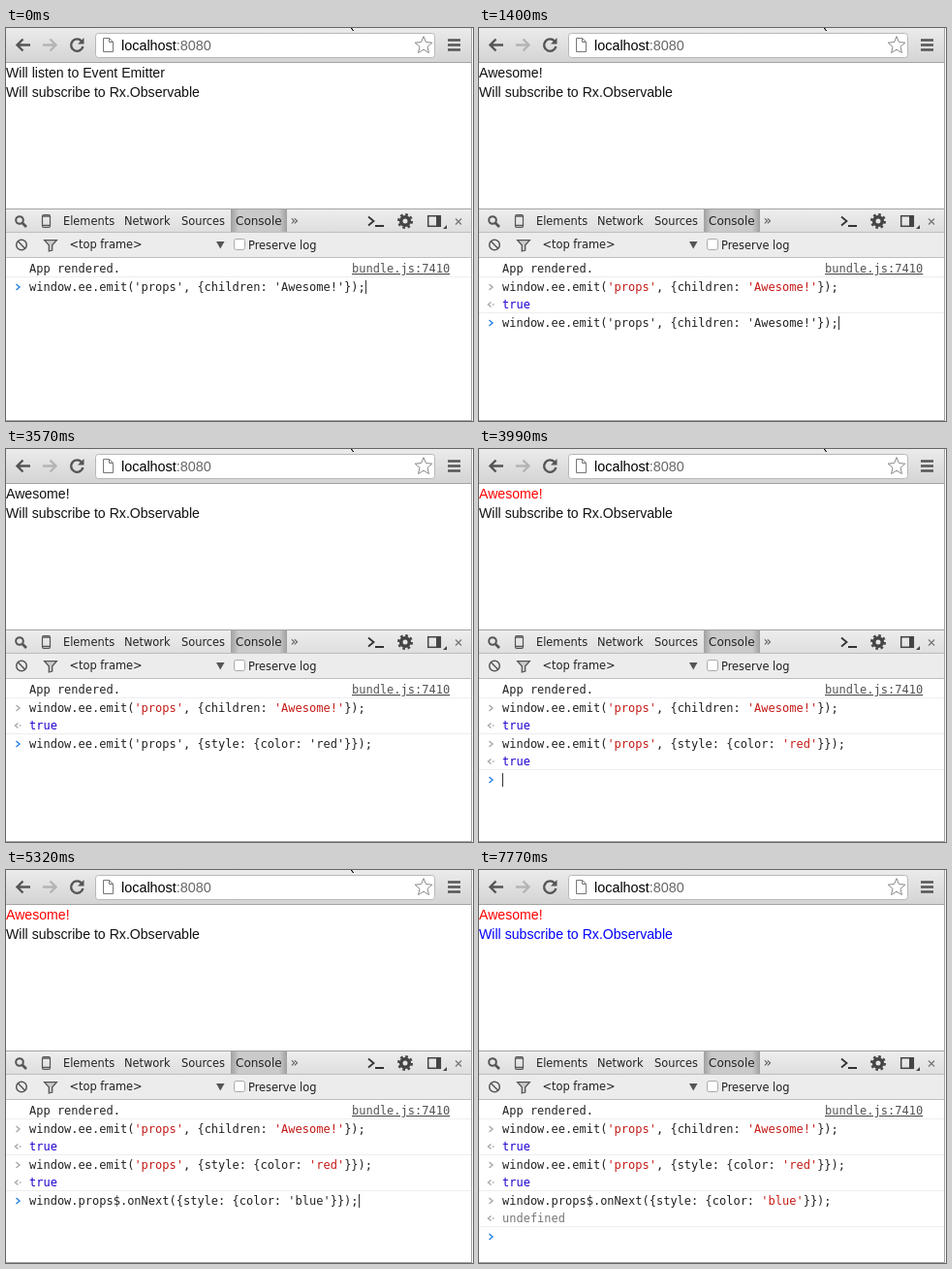
Write an HTML page that moves like this. It is 482 px wide and 405 px high and loops after 8.05 s.

```html
<!DOCTYPE html>
<html lang="en">
<head>
<meta charset="utf-8">
<title>Console demo</title>
<style>
html, body { margin: 0; width: 100%; height: 100%; overflow: hidden; background: #fff; }
svg { display: block; }
text { white-space: pre; fill: #222; }
.page { font: 14.12px "Liberation Sans", Arial, sans-serif; fill: #111; }
.ui { font: 11.4px "DejaVu Sans", sans-serif; }
.mono { font: 12px "DejaVu Sans Mono", monospace; }
.line { fill: none; stroke: #555; stroke-width: 1.5; }
</style>
</head>
<body>
<svg width="482" height="405" viewBox="0 0 482 405">
  <defs>
    <linearGradient id="bar" x2="0" y2="1"><stop stop-color="#ebebeb"/><stop offset="1" stop-color="#d4d4d4"/></linearGradient>
    <linearGradient id="tools" x2="0" y2="1"><stop stop-color="#eee"/><stop offset="1" stop-color="#dedede"/></linearGradient>
    <linearGradient id="tab"><stop stop-color="#a0a0a0"/><stop offset=".14" stop-color="#cacaca"/><stop offset=".86" stop-color="#cacaca"/><stop offset="1" stop-color="#a0a0a0"/></linearGradient>
  </defs>

  <!-- browser bar -->
  <rect width="481" height="35" fill="url(#bar)"/>
  <rect y="35" width="481" height="1" fill="#a3a3a3"/>
  <rect x="92.5" y="5.5" width="350" height="25" rx="3" fill="#fff" stroke="#b8b8b8"/>
  <g fill="none" stroke-width="2.4">
    <path d="M25 17.5H12M17.5 11.5L11.5 17.5L17.5 23.5" stroke="#555"/>
    <path d="M38 17.5H51M45.5 11.5L51.5 17.5L45.5 23.5" stroke="#b4b4b4"/>
    <path d="M78 13.5A6.2 6.2 0 1 0 79.4 19" stroke="#555"/>
    <path d="M456 12.5H469M456 17.5H469M456 22.5H469" stroke="#555"/>
  </g>
  <path d="M80.5 10V16.5H74Z" fill="#555"/>
  <path d="M100.5 10.5H106.5L110.5 14.5V24.5H100.5ZM106.5 10.5V14.5H110.5" fill="#fff" stroke="#777"/>
  <path id="star" fill="#fff" stroke="#888" stroke-linejoin="round"/>
  <text class="page" x="119" y="23" style="font-size:14.4px;fill:#000">localhost<tspan fill="#666">:8080</tspan></text>

  <!-- web page -->
  <text class="page" id="first" x="0" y="51"></text>
  <text class="page" id="second" x="0" y="71">Will subscribe to Rx.Observable</text>

  <!-- tool tabs -->
  <rect y="186" width="481" height="25" fill="url(#tools)"/>
  <rect y="186" width="481" height="1" fill="#a3a3a3"/>
  <rect x="232" y="187" width="58" height="24" fill="url(#tab)"/>
  <rect y="211" width="481" height="25" fill="#ececec"/>
  <path d="M0 210.5H481M0 236.5H481" stroke="#bdbdbd"/>
  <g class="line">
    <circle cx="14" cy="198" r="3.8" stroke-width="2"/><path d="M17 201L21 205" stroke-width="2.6"/>
    <rect x="37.5" y="192.5" width="8" height="13" rx="1.5" stroke-width="1.2"/><path d="M38 194H45M38 203.5H45"/>
    <path d="M374 194.5L379.5 199L374 203.5M381 204H390" stroke="#333" stroke-width="1.8"/>
    <circle cx="412" cy="199" r="4.3" stroke="#444" stroke-width="3.6"/>
    <circle cx="412" cy="199" r="6.8" stroke="#444" stroke-width="2.4" stroke-dasharray="2.67"/>
    <rect x="435.7" y="193.7" width="12.6" height="10.6" stroke="#444"/>
    <path d="M464 196.5L470 202.5M470 196.5L464 202.5" stroke="#777" stroke-width="1.3"/>
    <circle cx="16" cy="223.5" r="5.3"/><path d="M12.3 219.8L19.7 227.2"/>
    <path d="M39.7 218.7H52.3L47.7 223.7V229L44.3 230V223.7Z" fill="#ccc" stroke-width="1.3"/>
  </g>
  <path d="M444 194H448V204H444ZM455 203V207H451Z" fill="#444"/>
  <path d="M217 220H225.5L221.2 227.5Z" fill="#555"/>
  <rect x="235.5" y="217.5" width="11" height="11" rx="2" fill="#fff" stroke="#aaa"/>
  <g class="ui">
    <text x="59" y="203">Elements</text>
    <text x="122" y="203">Network</text>
    <text x="181" y="203">Sources</text>
    <text x="237" y="203" style="font-size:12px">Console</text>
    <text x="293.5" y="203" style="font-size:14px;fill:#555">»</text>
    <text x="65.5" y="227">&lt;top frame&gt;</text>
    <text x="250" y="228">Preserve log</text>
  </g>

  <!-- console -->
  <path d="M0 256.5H480" stroke="#eee"/>
  <g class="mono">
    <text x="24" y="252">App rendered.</text>
    <text x="357" y="252" style="fill:#545454" text-decoration="underline">bundle.js:7410</text>
    <g id="log"></g>
    <g id="prompt">
      <path d="M10.5 264L14 267L10.5 270" class="line" style="stroke:#2a84e8"/>
      <text id="input" x="24" y="271"></text>
      <rect id="caret" y="260" width="1" height="14" fill="#333"/>
    </g>
  </g>

  <path d="M480.5 0V404M0 404.5H481" stroke="#a3a3a3"/>
  <path id="mouse" d="M354 -1.5L356.5 -1.5L359.8 3L358 3.8Z" stroke="#fff"/>
</svg>
<script>
const LOOP = 8050, ROW = 37, CHAR = 7.224;
const $ = id => document.getElementById(id);

const text = "window.ee.emit('props', {children: 'Awesome!'});";
const red = "window.ee.emit('props', {style: {color: 'red'}});";
const blue = "window.props$.onNext({style: {color: 'blue'}});";

// time, typed text, caret shown
const input = [
  [0, text, 1], [210, text, 0], [700, '', 0], [770, '', 1], [1260, '', 0],
  [1400, text, 1], [1820, blue, 1], [2380, text, 1], [2940, text, 0],
  [3010, red, 1], [3570, red, 0], [3920, '', 0], [3990, '', 1],
  [4410, red, 1], [4830, text, 1], [5320, blue, 1], [5810, blue, 0],
  [6160, '', 1], [6720, '', 0], [7210, '', 1], [7770, '', 0]
];
const runs = [[700, text, 'true'], [3920, red, 'true'], [6160, blue, 'undefined']];

const paint = code => code.replace(/'[^']*'/g, s => `<tspan fill="#c41a16">${s}</tspan>`);

$('log').innerHTML = runs.map(([, code, result], i) => `
  <g transform="translate(0 ${i * ROW})">
    <path class="line" style="stroke:#aaa" d="M10.5 264L14 267L10.5 270M12.5 282.5L9.5 285L12.5 287.5M14 285H15.5"/>
    <text x="24" y="271">${paint(code)}</text>
    <text x="24" y="289" style="fill:${result === 'true' ? '#1c00cf' : '#777'}">${result}</text>
    <path d="M0 293.5H480" stroke="#eee"/>
  </g>`).join('');

$('star').setAttribute('d', 'M' + Array.from({ length: 10 }, (_, i) => {
  const r = i % 2 ? 4.2 : 9.3, a = i * Math.PI / 5;
  return `${431 + r * Math.sin(a)} ${18 - r * Math.cos(a)}`;
}).join('L') + 'Z');

function draw(now) {
  const t = now % LOOP;
  const [, typed, caret] = input.findLast(k => k[0] <= t);
  const count = runs.filter(r => r[0] <= t).length;

  [...$('log').children].forEach((g, i) => g.style.display = i < count ? '' : 'none');
  $('prompt').setAttribute('transform', `translate(0 ${count * ROW})`);
  $('input').textContent = typed;
  $('caret').setAttribute('x', Math.round(24 + typed.length * CHAR));
  $('caret').style.display = caret ? '' : 'none';

  $('first').textContent = t < 770 ? 'Will listen to Event Emitter' : 'Awesome!';
  $('first').style.fill = t < 3990 ? '' : '#f00';
  $('second').style.fill = t < 6160 ? '' : '#00f';

  // the pointer slips out over the top edge
  const exit = Math.min(1, Math.max(0, (t - 6720) / 210));
  $('mouse').setAttribute('transform', `translate(0 ${-6 * exit})`);
  requestAnimationFrame(() => draw(performance.now() - start));
}
const start = performance.now();
draw(0);
</script>
</body>
</html>
```
